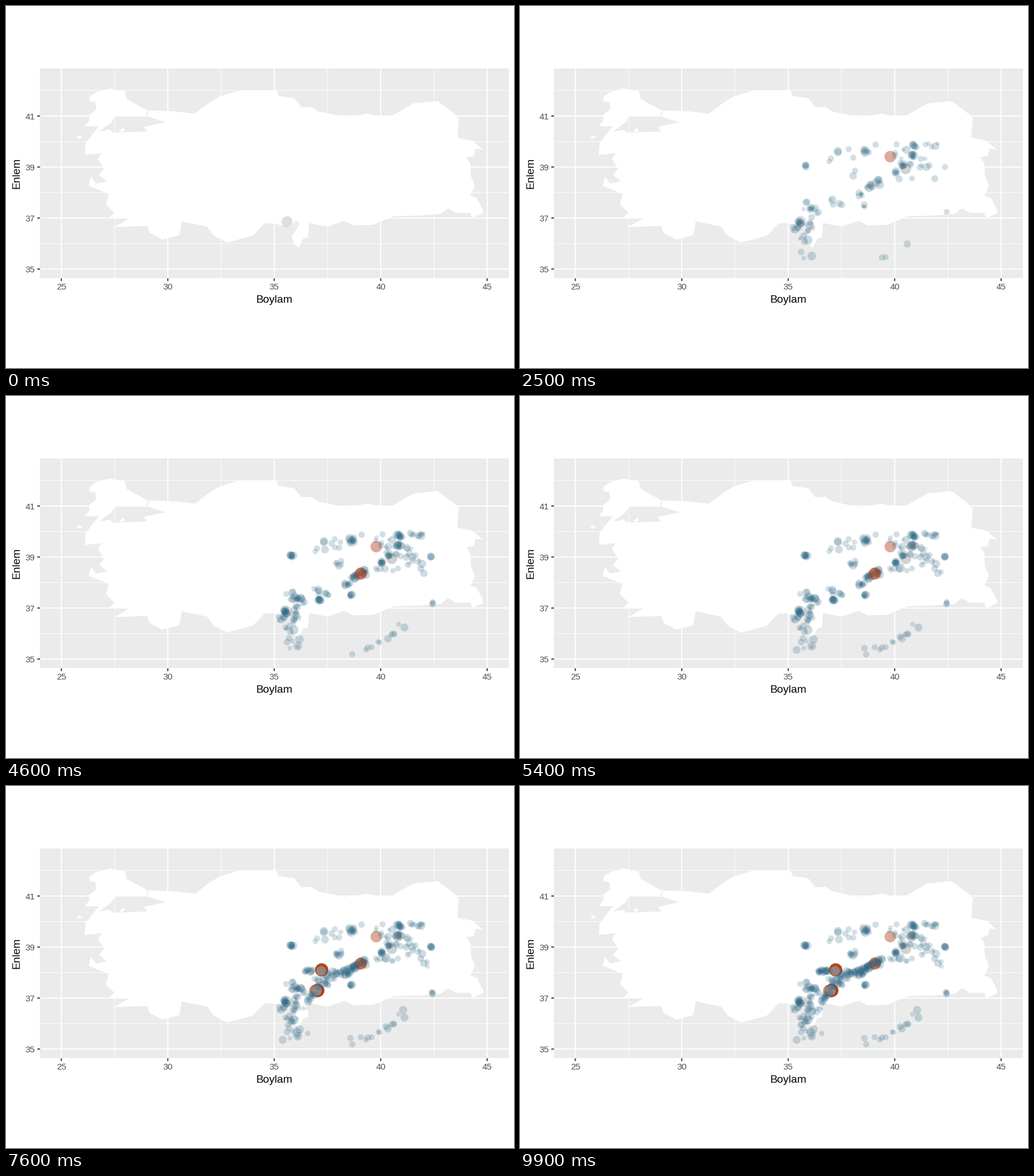
Recreate the animation shown at these times as a matplotlib script. Size 885 by 632 pixels, loop 10 s.

```python
import numpy as np
import matplotlib.pyplot as plt
from matplotlib.animation import FuncAnimation
from matplotlib.patches import Polygon, Rectangle

W, H, DPI = 885, 632, 100
PX = 72 / DPI
FRAMES, STEP = 100, 100
rng = np.random.default_rng(23)

plt.rcParams["font.family"] = "Liberation Sans"
fig = plt.figure(figsize=(W / DPI, H / DPI), dpi=DPI, facecolor="white")
ax = fig.add_axes([0, 0, 1, 1])
ax.set(xlim=(0, W), ylim=(H, 0))
ax.axis("off")


def lon(v):
    return 96.4 + (v - 25) * 37.09


def lat(v):
    return 192.1 + (41 - v) * 44.53


# Panel, grid and axes
L, R, T, B = 59.3, 875.5, 108.7, 475.4
TICK, LABEL, TITLE = 4.8, 15.3 * PX, 19.1 * PX
ax.add_patch(Rectangle((L, T), R - L, B - T, fc="#EBEBEB", ec="none"))


def line(xs, ys, width=1.9, color="white"):
    ax.plot(xs, ys, color=color, lw=width * PX, solid_capstyle="butt",
            snap=False, zorder=1.5)


for v in np.arange(27.5, 45, 5):
    line([lon(v)] * 2, [T, B], 0.95)
for v in range(36, 43, 2):
    line([L, R], [lat(v)] * 2, 0.95)
for v in range(25, 46, 5):
    line([lon(v)] * 2, [T, B])
    line([lon(v)] * 2, [B, B + TICK], color="#333333")
    ax.text(lon(v), 495, str(v), size=LABEL, color="#4D4D4D", ha="center")
for v in range(35, 42, 2):
    line([L, R], [lat(v)] * 2)
    line([L - TICK, L], [lat(v)] * 2, color="#333333")
    ax.text(50.6, lat(v) + 5.5, str(v), size=LABEL, color="#4D4D4D", ha="right")
ax.text((L + R) / 2, 518, "Boylam", size=TITLE, ha="center")
ax.text(23.2, (T + B) / 2, "Enlem", size=TITLE, ha="center", va="baseline",
        rotation=90, rotation_mode="anchor")

# Key points of the coast, clockwise
north = [(146, 158), (156, 151), (180, 144), (207, 149), (210, 162), (246, 182),
         (295, 184), (329, 188), (354, 169), (372, 158), (405, 148), (466, 148),
         (470, 145), (475, 157), (502, 161), (515, 177), (532, 176), (544, 184),
         (590, 194), (631, 188), (650, 193), (670, 193), (710, 170), (752, 166)]
east = [(780, 187), (789, 196), (786, 230), (812, 235), (831, 251), (818, 249),
        (815, 262), (802, 264), (809, 275), (810, 297), (817, 314), (809, 331),
        (820, 335), (831, 356), (831, 362), (812, 370), (809, 361)]
south = [(784, 361), (770, 353), (757, 363), (718, 366), (675, 367), (640, 382),
         (605, 383), (590, 375), (560, 385), (528, 379), (526, 404), (518, 406),
         (510, 422), (501, 415), (498, 402), (512, 380), (506, 374), (494, 386),
         (463, 379), (450, 380), (430, 401), (385, 413), (362, 401), (350, 385),
         (306, 376), (302, 400), (272, 408), (250, 396), (246, 384)]
west = [(188, 386), (215, 371), (180, 369), (189, 361), (174, 346), (179, 328),
        (144, 314), (148, 298), (157, 310), (176, 306), (162, 295), (171, 284),
        (160, 267), (167, 257), (137, 260), (139, 238), (158, 220), (180, 216),
        (186, 221), (246, 219), (240, 211), (278, 203), (247, 193)]
thrace = [(190, 193), (183, 204), (143, 233), (162, 210), (137, 210), (145, 200),
          (145, 190), (157, 181), (156, 168), (145, 166)]
isles = [[(122, 230), (127, 226), (132, 228), (131, 231)],
         [(197, 218), (204, 213), (207, 216), (203, 220)]]
strait = [(244, 191), (247, 183), (249, 183), (246, 192)]


def shape(points, color="white"):
    ax.add_patch(Polygon(points, closed=True, fc=color, ec="none", zorder=2))


for land in (north + east + south + west + thrace, *isles):
    shape(land)
shape(strait, "#EBEBEB")

# Quakes: frame, x, y, radius, r, g, b, alpha
BLUE, GREY, MIST, RUST = (51, 107, 135), (130, 130, 130), (140, 158, 168), (176, 55, 14)
EARLY, MIDDLE, LATE = (1, 25), (1, 46), (20, 56)
SECOND, AFTER = (64, 76), (57, 99)
quakes = []


def quake(frame, x, y, r, color=BLUE, alpha=None):
    alpha = 0.14 + 0.014 * r if alpha is None else alpha
    quakes.append((frame, x, y, r, *(c / 255 for c in color), alpha))


def swarm(span, n, start, end=None, width=4):
    """Scatter n dots around the line start-end, one after another over span."""
    start, end = np.array(start), np.array(end or start)
    along = rng.permutation((np.arange(n) + 0.5) / n)
    turn, out = rng.uniform(0, 2 * np.pi, n), width * np.sqrt(rng.uniform(0, 1, n))
    for k, frame in enumerate(np.linspace(*span, n).round()):
        x, y = start + (end - start) * along[k]
        quake(frame, x + out[k] * np.cos(turn[k]), y + out[k] * np.sin(turn[k]),
              rng.triangular(2.3, 5.8, 8.2))


# Dense knots
swarm(MIDDLE, 12, (488, 376))
swarm((1, 10), 7, (668, 278), width=3)
swarm(MIDDLE, 10, (655, 291), width=2)
swarm(EARLY, 9, (685, 262))
swarm(MIDDLE, 12, (685, 246), width=6)
swarm(MIDDLE, 10, (624, 308), width=6)
swarm(MIDDLE, 12, (607, 316), width=6)
swarm(MIDDLE, 8, (600, 349), width=3)
swarm(MIDDLE, 8, (498, 279), width=3)
swarm(MIDDLE, 9, (602, 252), width=5)
swarm((26, 46), 8, (546, 356), width=2)
swarm(LATE, 9, (580, 291), width=6)
swarm(LATE, 5, (740, 281), width=2)
swarm(LATE, 4, (743, 361), width=3)

# Looser belts
swarm(MIDDLE, 28, (652, 250), (704, 282), 16)
swarm(MIDDLE, 10, (704, 242), (728, 244), 4)
swarm(MIDDLE, 14, (532, 262), (618, 250), 11)
swarm(LATE, 8, (718, 276), (735, 310), 9)
swarm(LATE, 8, (640, 301), (682, 304), 5)
swarm(MIDDLE, 9, (586, 331), (600, 326))
swarm(MIDDLE, 9, (540, 335), (558, 350), 6)
swarm(MIDDLE, 22, (492, 346), (518, 358), 8)
swarm(MIDDLE, 22, (490, 416), (512, 368), 10)
swarm(EARLY, 6, (474, 392), (486, 382))
swarm(LATE, 16, (602, 450), (698, 398), 10)
swarm((11, 66), 9, (482, 438), (526, 426), 8)

# Aftershocks
swarm((57, 62), 12, (552, 346), (606, 316))
swarm((57, 62), 8, (526, 374), (538, 362))
swarm(SECOND, 12, (519, 324), (534, 322), 3)
swarm(SECOND, 16, (562, 328), (604, 318))
swarm(AFTER, 24, (556, 333), (606, 318), 5)
swarm(AFTER, 15, (600, 318), (632, 302))
swarm(AFTER, 18, (524, 378), (556, 335))
swarm(AFTER, 14, (490, 418), (524, 384), 5)
swarm((77, 99), 14, (517, 324), (541, 322), 3)

# Strong shocks
quake(0, 489, 376, 9.5, GREY, 0.26)
quake(4, 645, 263, 10, RUST, 0.42)
quake(6, 672, 284, 9.5, GREY, 0.36)
quake(8, 614, 313, 8.5, GREY, 0.22)
quake(44, 618, 310, 10.5, RUST, 0.62)
quake(52, 682, 263, 9, GREY, 0.3)
quake(55, 538, 357, 10, RUST, 0.55)
quake(56, 543, 357, 11.7, RUST, 0.93)
quake(57, 541, 357, 9, MIST, 0.8)
quake(65, 550, 321, 11.5, RUST, 0.93)
quake(66, 549, 323, 8.3, MIST, 0.7)

quakes = np.array(sorted(quakes, key=lambda q: q[0]))
when, spots = quakes[:, 0], quakes[:, 1:3]
sizes, colors = (2 * quakes[:, 3] * PX) ** 2, quakes[:, 4:]
dots = ax.scatter([], [], linewidths=0, zorder=3)


def draw(frame):
    n = np.searchsorted(when, frame, side="right")
    dots.set_offsets(spots[:n])
    dots.set_sizes(sizes[:n])
    dots.set_facecolors(colors[:n])
    return [dots]


anim = FuncAnimation(fig, draw, frames=FRAMES, interval=STEP,
                     repeat=True, repeat_delay=0)
plt.show()
```
